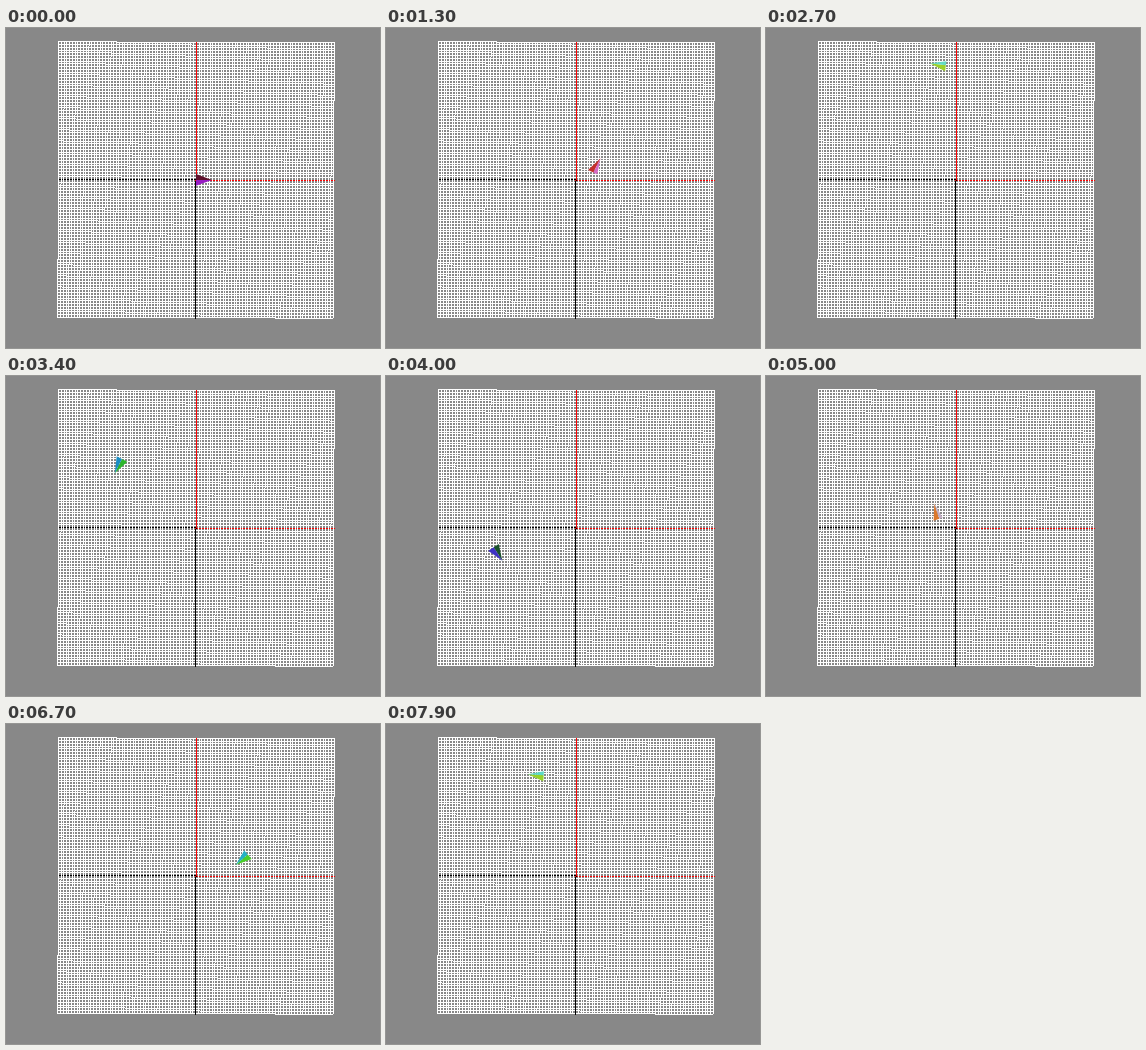
Write an HTML page with a canvas that moves like this. It is 374x320 px and loops after 8000 ms.

```html
<!DOCTYPE html>
<html>
<head>
<meta charset="utf-8">
<title>Glider over a grid</title>
<style>
  html, body { margin: 0; width: 100%; height: 100%; overflow: hidden; background: #888; }
  canvas { display: block; }
</style>
</head>
<body>
<canvas id="stage" width="374" height="320"></canvas>
<script>
const W = 374, H = 320, LOOP = 8000, STEP = 100;
const FIRST_STEP = 4, STEPS_PER_KEY = 4;
const ctx = document.getElementById('stage').getContext('2d');

// Evenly timed spline keys; the first and last only set the end tangents.
const keys = [
  [191, 149.5], [198, 152], [205, 149.5], [208.5, 142.5], [220, 116], [225.5, 84],
  [207, 50], [160.5, 36.5], [126.5, 67], [103.5, 117], [112, 178], [150, 189],
  [174.5, 157], [167.5, 113], [195, 78], [237, 73], [256, 104], [228, 140],
  [206, 106], [185, 60], [137, 50], [88, 52]
];

// Catmull-Rom position and velocity along one axis
function spline(time, axis) {
  const i = Math.min(Math.floor(time), keys.length - 4), u = time - i;
  const [p, q, r, s] = keys.slice(i, i + 4).map(key => key[axis]);
  const a = (3 * (q - r) + s - p) / 2, b = p - 2.5 * q + 2 * r - s / 2, c = (r - p) / 2;
  return { at: ((a * u + b) * u + c) * u + q, v: (3 * a * u + 2 * b) * u + c };
}

// The grid is square and very slightly rotated about its centre.
function makeGrid() {
  const canvas = document.createElement('canvas');
  canvas.width = W;
  canvas.height = H;
  const g = canvas.getContext('2d');
  const cx = 190, cy = 152, tilt = 0.00327, half = 137.74, cells = 100;
  const line = (vertical, offset, from, to, color) => {
    g.fillStyle = color;
    for (let d = from; d <= to + 0.5; d++) {
      const x = vertical ? offset : d, y = vertical ? d : offset;
      g.fillRect(Math.floor(cx + x - y * tilt), Math.floor(cy + y + x * tilt), 1, 1);
    }
  };
  const lines = vertical => {
    for (let k = 0; k <= cells; k++)
      line(vertical, (2 * k / cells - 1) * half, -half, half, '#fff');
  };
  g.fillStyle = '#888';
  g.fillRect(0, 0, W, H);
  lines(false);
  line(false, 0, -half, 0, '#000');
  line(false, 0, 0, half, '#f00');
  lines(true);
  line(true, 0, 0, half, '#000');
  line(true, 0, -half, 0, '#f00');
  return canvas;
}

function wing(color, side) {
  ctx.fillStyle = color;
  ctx.beginPath();
  ctx.moveTo(8, 0);
  ctx.lineTo(-8, 0);
  ctx.lineTo(-8, side);
  ctx.fill();
}

function drawGlider(step) {
  const time = (step - FIRST_STEP) / STEPS_PER_KEY;
  const x = spline(time, 0), y = spline(time, 1);
  const angle = Math.atan2(y.v, x.v);
  // Each wing's shade swings with the heading, measured anticlockwise.
  const swing = (base, amp, phase) =>
    base + amp * Math.cos(-angle - phase * Math.PI / 180);
  const rgb = (...parts) => `rgb(${parts.map(v => Math.round(v * 255))})`;
  ctx.save();
  ctx.translate(x.at, y.at);
  ctx.rotate(angle);
  wing(rgb(swing(0.47, 0.39, 105), swing(0.45, 0.4, 195), 0.17), -6);
  wing(rgb(swing(0.47, 0.37, 70), swing(0.48, 0.38, 165), 0.77), swing(5, 1.5, -60));
  ctx.restore();
}

const grid = makeGrid();
const start = performance.now();

function frame() {
  const t = Math.max(0, performance.now() - start) % LOOP;
  ctx.drawImage(grid, 0, 0);
  drawGlider(Math.max(FIRST_STEP, Math.floor(t / STEP)));
  requestAnimationFrame(frame);
}
frame();
</script>
</body>
</html>
```
